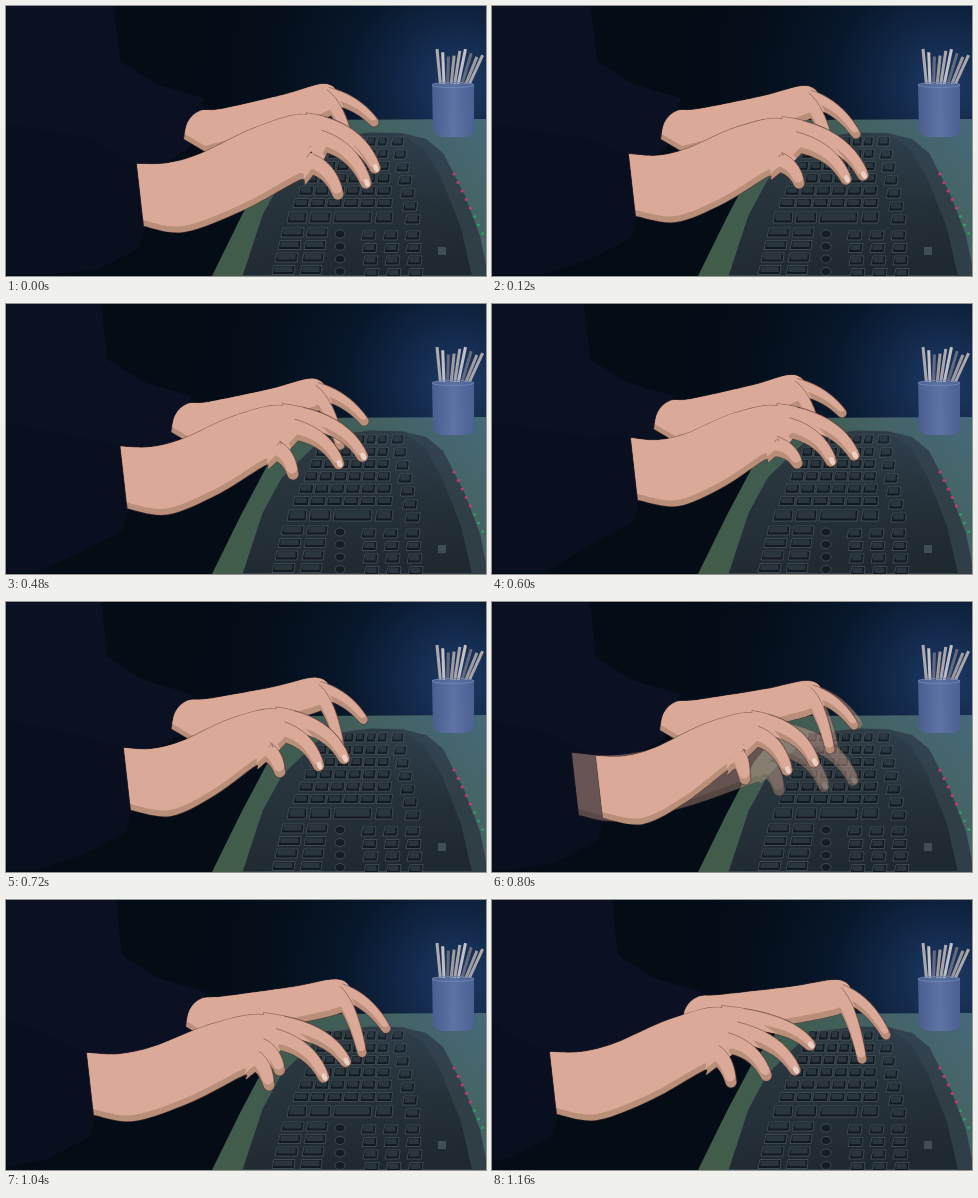
Write an HTML page with a canvas that moves like this. It is 480x270 px and loops after 1.2 s.

```html
<!DOCTYPE html>
<html lang="en">
<head>
<meta charset="utf-8">
<title>Typing hands</title>
<style>
html, body { margin: 0; width: 100%; height: 100%; overflow: hidden; background: #050e18; }
canvas { display: block; width: 100vw; height: 100vh; }
</style>
</head>
<body>
<canvas id="stage" width="480" height="270"></canvas>
<script>
const W = 480, H = 270, LOOP = 1200, STEP = 40;
const SKIN = '#dba997', SHADE = '#b98f79', INK = 'rgba(88,58,54,.6)';

const add = (p, x, y) => [p[0] + x, p[1] + y];
const lerp = (a, b, k) => [a[0] + (b[0] - a[0]) * k, a[1] + (b[1] - a[1]) * k];
const clamp = v => Math.max(0, Math.min(1, v));

function makeCanvas() {
  const c = document.createElement('canvas');
  c.width = W;
  c.height = H;
  return c.getContext('2d');
}

// Near hand: wrist, knuckle, three fingertips. Far hand: heel, knuckle, fingertip.
const pose = (t, wrist, knuckle, a, b, c, heel, crest, tip) =>
  ({ t, joints: { wrist, knuckle, a, b, c, heel, crest, tip } });

const poses = [
  pose(0, [131, 158], [300, 109], [369, 162], [360, 177], [332, 188], [178, 133], [318, 78], [368, 116]),
  pose(120, [137, 148], [290, 113], [371, 169], [354, 173], [307, 177], [169, 133], [313, 80], [364, 128]),
  pose(320, [82, 154], [265, 102], [349, 154], [324, 163], [263, 185], [170, 132], [314, 80], [369, 128]),
  pose(600, [139, 134], [285, 102], [362, 151], [339, 157], [305, 159], [162, 125], [300, 71], [350, 109]),
  pose(800, [104, 154], [260, 111], [322, 160], [295, 168], [253, 177], [168, 128], [316, 79], [362, 123]),
  pose(920, [104, 154], [285, 122], [361, 178], [332, 184], [287, 188], [170, 128], [316, 79], [366, 122]),
  pose(1160, [58, 152], [230, 108], [318, 145], [303, 170], [239, 182], [190, 125], [345, 80], [394, 135])
];

// Moments where a second drawing shows through.
const echoes = [
  { t: 800, joints: { ...poses[5].joints, wrist: [80, 151] } },
  { t: 920, joints: poses[6].joints }
];

function jointsAt(t) {
  const i = Math.min(poses.length - 2, poses.findLastIndex(p => p.t <= t));
  const a = poses[i], b = poses[i + 1], k = (t - a.t) / (b.t - a.t);
  return Object.fromEntries(Object.keys(a.joints).map(n => [n, lerp(a.joints[n], b.joints[n], k)]));
}

function poly(c, p, fill) {
  c.beginPath();
  p.forEach(([x, y]) => c.lineTo(x, y));
  c.closePath();
  c.fillStyle = fill;
  c.fill();
}

// Smooth outline through the points, closed with a straight line.
function smooth(p) {
  const path = new Path2D(), at = i => p[Math.max(0, Math.min(p.length - 1, i))], k = 1 / 6;
  path.moveTo(...p[0]);
  for (let i = 0; i < p.length - 1; i++) {
    const [a, b, c, d] = [at(i - 1), at(i), at(i + 1), at(i + 2)];
    path.bezierCurveTo(b[0] + (c[0] - a[0]) * k, b[1] + (c[1] - a[1]) * k,
      c[0] - (d[0] - b[0]) * k, c[1] - (d[1] - b[1]) * k, ...c);
  }
  path.closePath();
  return path;
}

// A tapered limb that arches from its base down to the tip.
function finger(base, tip, thick, thin, reach) {
  const bend = [base[0] + (tip[0] - base[0]) * reach, base[1] + (tip[1] - base[1]) * .1];
  const upper = [], lower = [], n = 12;
  let angle;
  for (let i = 0; i <= n; i++) {
    const k = i / n, from = lerp(base, bend, k), to = lerp(bend, tip, k);
    const r = thick + (thin - thick) * k, [x, y] = lerp(from, to, k);
    angle = Math.atan2(to[1] - from[1], to[0] - from[0]);
    const dx = Math.sin(angle) * r, dy = -Math.cos(angle) * r;
    upper.push([x + dx, y + dy]);
    lower.unshift([x - dx, y - dy]);
  }
  const path = new Path2D(), edge = new Path2D();
  upper.forEach(p => path.lineTo(...p));
  path.arc(...tip, thin, angle - Math.PI / 2, angle + Math.PI / 2);
  lower.forEach(p => path.lineTo(...p));
  path.closePath();
  upper.slice(2).forEach(p => edge.lineTo(...p));
  return { path, edge, tip, angle };
}

function nearHand({ wrist, knuckle, a, b, c }) {
  const cuff = add(wrist, 7, 62), heel = add(cuff, 40, 6);
  const palm = lerp(add(knuckle, -19, 62), add(c, -27, -11), .5);
  const spread = clamp((Math.hypot(b[0] - c[0], b[1] - c[1]) - 48) / 12);
  const root = k => lerp(add(knuckle, 0, 8), palm, k);
  const d = lerp(root(.6), lerp(c, b, .55), spread);
  const body = smooth([wrist, add(lerp(wrist, knuckle, .18), 0, 8), add(lerp(wrist, knuckle, .38), 0, 8),
    add(lerp(wrist, knuckle, .7), 0, -2), knuckle, lerp(knuckle, b, .4), lerp(palm, c, .2), palm,
    add(lerp(heel, palm, .5), 2, 4), heel, cuff]);
  const fingers = [[a, .02], [b, .25], [d, .45], [c, .68]].map(([tip, k]) => finger(root(k), tip, 11, 5.5, .75));
  return { body, fingers, nails: fingers.slice(0, 2) };
}

function farHand({ heel, crest, tip }) {
  const base = add(crest, -8, 10);
  const body = smooth([heel, add(heel, 4, -17), add(heel, 16, -28), add(heel, 38, -30),
    add(lerp(add(heel, 38, -30), crest, .6), 0, 1), crest, add(crest, 14, 12), add(crest, 2, 34), add(heel, 22, 13)]);
  const fingers = [tip, add(tip, -24, 24)].map(p => finger(base, p, 9, 4.5, .62));
  return { body, fingers, nails: [] };
}

function drawHand(c, { body, fingers, nails }) {
  const all = new Path2D(body);
  fingers.forEach(f => all.addPath(f.path));
  c.strokeStyle = INK;
  c.lineWidth = 1.5;
  c.stroke(all);
  c.fillStyle = SHADE;
  c.fill(all);
  c.save();
  c.clip(all);
  c.translate(-1, -6);
  c.fillStyle = SKIN;
  c.fill(all);
  c.restore();
  c.lineWidth = .8;
  fingers.forEach(f => c.stroke(f.edge));
  c.fillStyle = '#ead0c6';
  nails.forEach(({ tip: [x, y], angle }) => {
    c.beginPath();
    c.ellipse(x + 1, y, 4, 2.6, angle, 0, 7);
    c.fill();
  });
}

function drawHands(c, joints) {
  drawHand(c, farHand(joints));
  drawHand(c, nearHand(joints));
}

function drawSleeves(c, { wrist, heel }) {
  const [x, y] = wrist, [hx, hy] = heel, edge = hx - 64;
  poly(c, [[0, 0], [edge - 6, 0], [edge, 55], [hx - 28, 78], [hx + 20, 92], [hx + 6, hy + 8], [x, y + 20], [0, 230]], '#0b1022');
  poly(c, [[0, 118], [x - 45, 132], [x - 10, y - 3], [x + 2, y], [x + 8, y + 64], [x + 2, y + 84],
    [x - 40, y + 106], [x - 85, 268], [0, 268]], '#0a0f20');
}

function gradient(c, box, ...stops) {
  const g = box.length === 4 ? c.createLinearGradient(...box) : c.createRadialGradient(...box);
  stops.forEach((s, i) => g.addColorStop(i / (stops.length - 1), s));
  return g;
}

function key(c, x, y, w, h) {
  poly(c, [[x + 1, y], [x + w + 1, y], [x + w, y + h], [x - 1, y + h]], '#121a20');
  c.strokeStyle = '#4c5961';
  c.lineWidth = .7;
  c.stroke();
  c.fillStyle = '#2a363d';
  c.fillRect(x + 1.5, y + 1, w - 3, h - 3.5);
}

function drawKeyboard(c) {
  poly(c, [[236, 270], [256, 209], [275, 174], [318, 132], [365, 126], [397, 127], [420, 133], [437, 147],
    [458, 188], [474, 230], [482, 270]], gradient(c, [340, 125, 360, 270], '#2d3a42', '#26323a', '#1e282f'));
  c.strokeStyle = '#465a5b';
  c.lineWidth = 1;
  c.stroke();
  poly(c, [[396, 128], [420, 133], [437, 147], [458, 188], [474, 230], [482, 270], [466, 270], [455, 222],
    [436, 174], [419, 144]], '#303e45');

  for (let r = 0; r < 6; r++) {
    const left = 316 - r * 5.6, w = (383 + r - left) / 6;
    for (let i = 0; i < 6; i++) key(c, left + i * w, 131 + r * 12.3, w - 2.5, 9);
  }
  [[282, 18], [304, 20], [328, 37], [370, 16]].forEach(([x, w]) => key(c, x, 206, w, 11));
  for (let r = 0; r < 7; r++) key(c, 386 + r * 2.3, 131 + r * 13, 11 + r * .4, 9);
  for (let r = 0; r < 4; r++) {
    const y = 222 + r * 12.5;
    key(c, 276 - r * 3, y, 21, 9);
    key(c, 301 - r * 2, y, 20, 9);
    for (let i = 0; i < 3; i++) key(c, 356 + i * 22 + r, y + 3, 13, 9);
    c.beginPath();
    c.ellipse(334, y + 6, 5, 4, 0, 0, 7);
    c.fillStyle = '#141d23';
    c.fill();
    c.stroke();
  }
  c.fillStyle = '#424e55';
  c.fillRect(432, 241, 8, 8);

  for (let i = 0; i < 8; i++) {
    c.fillStyle = i < 5 ? '#c93a68' : '#2f9a62';
    c.beginPath();
    c.arc(448 + i * 4.1, 168 + i * 8.5, 1.6, 0, 7);
    c.fill();
  }
}

function drawCup(c) {
  const tones = ['#c5b8ae', '#e0d6ce', '#6f6a72', '#b8a89c'];
  c.lineWidth = 3;
  for (let i = 0; i < 9; i++) {
    c.strokeStyle = tones[i % 4];
    c.beginPath();
    c.moveTo(431 + i * 5.7, 47 + 4 * Math.sin(i * 1.3 - 1.5));
    c.lineTo(435 + i * 3.2, 84);
    c.stroke();
  }
  poly(c, [[426, 78], [468, 78], [468, 127], [461, 131], [434, 131], [427, 126]],
    gradient(c, [426, 0, 469, 0], '#4b5d8a', '#6477a4', '#4d5f8c'));
  c.strokeStyle = '#7d8cb4';
  c.lineWidth = 1;
  c.beginPath();
  c.ellipse(447, 79, 21, 2.5, 0, 0, 7);
  c.stroke();
}

function drawScene(c) {
  c.fillStyle = '#040c16';
  c.fillRect(0, 0, W, H);
  c.fillStyle = gradient(c, [450, 75, 5, 430, 70, 250], 'rgba(20,50,96,.75)', 'rgba(9,28,52,.5)', 'rgba(4,12,22,0)');
  c.fillRect(0, 0, W, H);
  poly(c, [[206, 270], [235, 211], [262, 160], [300, 114], [480, 113], [480, 270]],
    gradient(c, [220, 270, 470, 110], '#425c49', '#3f5c52', '#48696e'));
  drawKeyboard(c);
  drawCup(c);
  c.fillStyle = gradient(c, [460, 85, 5, 460, 85, 120], 'rgba(62,101,163,.25)', 'rgba(62,101,163,0)');
  c.fillRect(300, 0, 180, 220);
}

const ctx = document.getElementById('stage').getContext('2d');
const scene = makeCanvas(), layer = makeCanvas();
drawScene(scene);

function drawEcho(echo, alpha) {
  layer.clearRect(0, 0, W, H);
  drawHands(layer, echo.joints);
  ctx.globalAlpha = alpha;
  ctx.drawImage(layer.canvas, 0, 0);
  ctx.globalAlpha = 1;
}

function draw(t) {
  const joints = jointsAt(t);
  ctx.drawImage(scene.canvas, 0, 0);
  drawSleeves(ctx, joints);
  echoes.forEach(e => {
    const gap = Math.abs(t - e.t) / STEP;
    if (gap < 2) drawEcho(e, .45 * (1 - gap / 2));
  });
  drawHands(ctx, joints);
}

const start = performance.now();
function tick() {
  const t = (performance.now() - start) % LOOP;
  draw(Math.floor(t / STEP) * STEP);
  requestAnimationFrame(tick);
}
tick();
</script>
</body>
</html>
```
